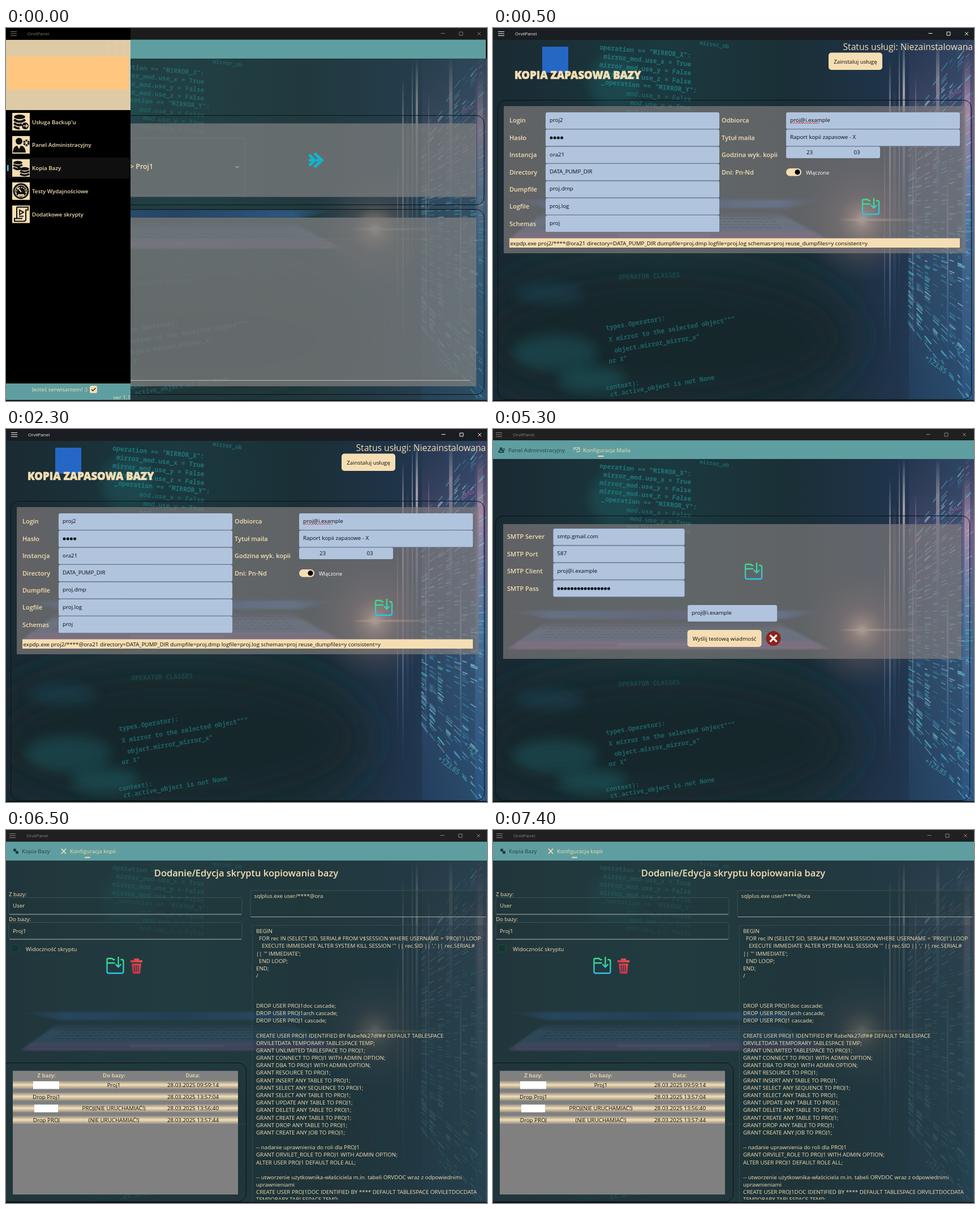
An HTML page for the animation above (8 s loop, 850 by 659 pixels).

```html
<!DOCTYPE html>
<html lang="pl">
<head>
<meta charset="utf-8">
<title>OrvilPanel</title>
<style>
  html, body { margin: 0; width: 100%; height: 100%; overflow: hidden; background: #000; }
  svg { display: block; }
  text { font-family: "Open Sans", sans-serif; white-space: pre; }
  .code text { font-family: "Noto Sans Mono", monospace; font-weight: 600; fill: #207d82; }
</style>
</head>
<body>
<svg id="stage" width="850" height="659" viewBox="0 0 850 659"></svg>
<script>
const WHEAT = '#f5deb3', CADET = '#5f9ea0', STEEL = '#b0c4de', INK = '#0c0c0c';
const BASE = 9.75;

const rect = (x, y, w, h, fill, extra = '') =>
  `<rect x="${x}" y="${y}" width="${w}" height="${h}" fill="${fill}" ${extra}/>`;
const path = (d, stroke, width = 1, extra = '') =>
  `<path d="${d}" fill="none" stroke="${stroke}" stroke-width="${width}" ${extra}/>`;
const circle = (x, y, r, fill, extra = '') => `<circle cx="${x}" cy="${y}" r="${r}" fill="${fill}" ${extra}/>`;
const ellipse = (x, y, rx, ry, fill, extra = '') =>
  `<ellipse cx="${x}" cy="${y}" rx="${rx}" ry="${ry}" fill="${fill}" ${extra}/>`;
const haze = (x, y, rx, ry, fill, alpha) => ellipse(x, y, rx, ry, fill, `opacity="${alpha}" filter="url(#haze)"`);
const at = (x, y, body) => `<g transform="translate(${x} ${y})">${body}</g>`;
// y is the middle of the capitals
const text = (x, y, s, { size = BASE, fill = WHEAT, weight = 400, anchor = 'start', extra = '' } = {}) =>
  `<text x="${x}" y="${y + size * .36}" font-size="${size}" fill="${fill}" font-weight="${weight}" text-anchor="${anchor}" ${extra}>${s}</text>`;
const label = (x, y, s) => text(x, y, s, { size: 11, weight: 600 });
const dark = (x, y, s, anchor) => text(x, y, s, { fill: INK, anchor });
const outline = (x, y, w, h) => rect(x, y, w, h, 'none', 'rx="14" stroke="#0b1416"');
const field = (x, y, w, s) => rect(x, y, w, 29.6, STEEL, 'rx="3"') +
  path(`M${x + 2} ${y + 29.4}h${w - 4}`, '#6f7f92') + dark(x + 7, y + 13.5, s);
const dots = (x, y, n, step) =>
  Array.from({ length: n }, (_, i) => circle(x + i * step, y, 2.5, INK)).join('');

function stops(list) {
  return list.map(([o, c, a = 1]) => `<stop offset="${o}" stop-color="${c}" stop-opacity="${a}"/>`).join('');
}
const linear = (id, dir, list) => `<linearGradient id="${id}" ${dir}>${stops(list)}</linearGradient>`;
const DOWN = 'x1="0" y1="0" x2="0" y2="1"', ACROSS = '';

let seed = 11;
const rnd = () => (seed = (seed * 16807) % 2147483647) / 2147483647;

const defs = `<defs>
  ${linear('room', ACROSS, [[0, '#1a2a33'], [.36, '#1b393f'], [.62, '#1a2f36'], [.84, '#20344c'], [1, '#2a4a68']])}
  ${linear('lid', ACROSS, [[0, '#264a83', 0], [.15, '#2b5a9c'], [.5, '#24407a'], [.85, '#2f62a6'], [1, '#264a83', 0]])}
  ${linear('desk', DOWN, [[0, '#27324f'], [.3, '#3f6486'], [.65, '#3c5c86'], [.75, '#7b5c92'], [1, '#57477a']])}
  ${linear('streak', DOWN, [[0, '#fff', 0], [.25, '#e2bfc4', .9], [.6, '#8fb2dc', .6], [1, '#4b7fd0', 0]])}
  ${linear('pane', DOWN, [[0, '#55304f', .3], [.2, '#9a6a9c', .8], [.5, '#5d7fa8', .7], [1, '#2c5f98', .6]])}
  ${linear('save', DOWN, [[0, '#43e07c'], [1, '#2cc4ea']])}
  ${linear('bin', 'x1="0" y1="1" x2="1" y2="0"', [[0, '#b5274f'], [1, '#f0554a']])}
  ${linear('row', DOWN, [[0, '#8c8a86'], [.5, WHEAT], [1, '#969086']])}
  <radialGradient id="glow">${stops([[0, '#f8e2cc', 1], [.13, '#d3ab96', .75], [.4, '#8d6a66', .4], [1, '#54505a', 0]])}</radialGradient>
  ${linear('ray', ACROSS, [[0, '#d9a98c', 0], [.2, '#f3cdb0', .8], [1, '#d9a98c', 0]])}
  <filter id="soft" x="-20%" y="-20%" width="140%" height="140%"><feGaussianBlur stdDeviation="1.8"/></filter>
  <filter id="haze" x="-50%" y="-50%" width="200%" height="200%"><feGaussianBlur stdDeviation="10"/></filter>
  <filter id="dusk" x="-50%" y="-50%" width="200%" height="200%"><feGaussianBlur stdDeviation="35"/></filter>
</defs>`;

// Code along the right wall: every row lies on a line through one vanishing point
function codeWall() {
  const tints = ['#4cc4c0', '#4692c8', '#9cc6d6', '#35789f'];
  let out = rect(735, 0, 115, 606, 'url(#pane)', 'opacity=".3"') + rect(829, 0, 21, 606, 'url(#pane)', 'opacity=".65"');
  for (let column = 0; column < 8; column++) {
    const x = 734 + column * 14.5, reach = (x - 600) / 250;
    for (let i = 0; i < 75; i++) {
      const slope = (rnd() - .5) * 2.6, y = 302 + slope * 250 * reach, len = 4 + 9 * rnd();
      out += path(`M${x} ${y.toFixed(1)}l${len.toFixed(1)} ${(len * slope).toFixed(1)}`,
        tints[Math.floor(4 * rnd())], 1.7, `opacity="${(.25 + .5 * rnd()).toFixed(2)}"`);
    }
  }
  for (const [x, y, h, w, a] of [[691, 170, 340, 2, .45], [700, 32, 510, 3, .75], [707, 80, 400, 5, .25], [717, 2, 430, 2, .6],
    [724, 0, 350, 4, .8], [741, 180, 350, 2, .5], [746, 60, 330, 2, .5], [783, 0, 290, 6, .5], [802, 220, 330, 3, .4], [833, 30, 380, 10, .5]])
    out += rect(x, y, w, h, 'url(#streak)', `opacity="${a}"`);
  const figure = (x, y, turn, s, fill) =>
    `<text transform="translate(${x} ${y}) rotate(${turn})" font-size="12" fill="${fill}" opacity=".75">${s}</text>`;
  return out + figure(805, 100, -30, '+345', '#d058a0') + figure(762, 535, 35, '+123.85', '#4cc4c0') + figure(808, 510, 38, '+123', '#4cc4c0');
}

function laptop() {
  let out = `<g filter="url(#soft)"><path d="M90 290H505L595 336H25Z" fill="url(#desk)" opacity=".9"/>
    <path d="M20 268H590L520 282H95Z" fill="url(#lid)" opacity=".9"/>
    ${path('M220 328H385', '#a9a2c4', 3, 'opacity=".45"')}${path('M40 334H580', '#a06ba8', 2.5, 'opacity=".7"')}</g>`;
  for (let y = 295; y < 317; y += 5)
    out += path(`M${105 - (y - 295)} ${y}H${490 + (y - 295)}`, '#1d2c44', 1.5, 'stroke-dasharray="8 3" opacity=".6"');
  return out;
}

// Blurred photo of a code wall and a laptop, drawn in an 850 x 606 box
function photo() {
  const mono = (x, y, turn, s, anchor = 'start', size = 11.3, alpha = .7) =>
    `<text transform="translate(${x} ${y}) rotate(${turn})" font-size="${size}" text-anchor="${anchor}" opacity="${alpha}">${s}</text>`;
  const upper = ['operation == "MIRROR_X":', 'mirror_mod.use_x = True', 'mirror_mod.use_y = False',
    'mirror_mod.use_z = False', '_operation == "MIRROR_Y":', 'mod.use_x = False', 'mod.use_y = True', 'mod.use_z = False'];
  const lower = [[200, 487, 'types.Operator):'], [205, 507, 'X mirror to the selected object"""'], [215, 525, 'object.mirror_mirror_x"'],
    [205, 543, 'or X"'], [200, 588, 'context):'], [208, 599, 'ct.active_object is not None']];
  return rect(0, 0, 850, 606, 'url(#room)') +
    ellipse(300, 500, 340, 130, '#16262a', 'opacity=".9" filter="url(#dusk)"') +
    haze(110, 525, 75, 30, '#1d5a60', .5) + haze(175, 570, 60, 22, '#1f666b', .45) +
    haze(100, 425, 60, 16, '#1b4a5c', .5) + haze(215, 70, 45, 45, '#1d6468', .4) +
    laptop() + '<g class="code">' +
    upper.map((s, i) => mono(350 + (i == 4 ? 10 : 0), 30 + i * 14.7, 5, s, 'end', 11.3, i > 4 ? .6 : .9)).join('') +
    mono(365, 8, 7, 'mirror_ob', 'start', 9.6) + mono(222, 402, -2, 'OPERATOR CLASSES', 'start', 11.3, .35) +
    lower.map(([x, y, s]) => mono(x, y, -9, s, 'start', 11.1)).join('') + '</g>' +
    codeWall() + circle(652, 302, 105, 'url(#glow)') + rect(610, 300, 170, 4, 'url(#ray)');
}
const backdrop = top => `<use href="#photo" transform="translate(0 ${top}) scale(1 ${(659 - top) / 606})"/>`;

function titleBar(x, fill, bg, right, height = 20) {
  const [a, b, c] = [right - 64, right - 32, right];
  return rect(0, 0, 850, height, bg) +
    path(`M${x - 30} 6.5h11m-11 3.5h11m-11 3.5h11`, fill) +
    text(x, 10.5, 'OrvilPanel', { size: 8, fill }) +
    path(`M${a - 3.5} 9.5h7M${b - 3} 7h6v6h-6zM${c - 3} 7l6 6m0-6l-6 6`, fill);
}
const tab = (x, s, active) => text(x, 37.5, s, { fill: active ? WHEAT : '#223e42' });
const saveIcon = (x, y) => at(x, y, path('M16 5h-3l-2-2H4q-2 0-2 2v21q0 3 3 3h23q3 0 3-3V8q0-3-3-3h-2M2 11h14M22 0v18m-5-5l5 5 5-5', 'url(#save)', 2.3));
const footLine = rect(0, 657.5, 850, 1.5, '#05080a');

function menuScene() {
  const icons = [
    ellipse(13, 7, 10, 4, '#111') + path('M3 12q10 7 20 0M3 18q8 6 14 2M3 24q5 4 10 3', '#111', 4) + circle(23, 23, 6, '#111') + path('M19 23h8m-3-3l3 3-3 3', WHEAT, 1.5),
    circle(12, 9, 6, '#111') + `<path d="M1 29q1-12 8-12l3 6 3-6q8 0 9 12z" fill="#111"/>` + circle(25, 12, 4, 'none', 'stroke="#111" stroke-width="3.5" stroke-dasharray="3 1.2"'),
    ellipse(10, 6, 8, 3, '#111') + path('M2 10q8 5 16 0M2 15q8 5 14 1', '#111', 3.5) + ellipse(22, 17, 8, 3, '#111') + path('M14 21q8 5 16 0M14 26q8 5 16 0', '#111', 3.5) + path('M9 13l9 6', '#111', 3),
    circle(15.5, 15.5, 14, '#111') + circle(15.5, 15.5, 11, WHEAT) + circle(15.5, 15.5, 10, '#111') + path('M7 20q0-11 8.5-11t8.5 11', WHEAT, 2, 'stroke-dasharray="2 2"') + path('M9 9l7 8', WHEAT, 2) + rect(10, 21, 11, 3, WHEAT),
    path('M8 3h20v5h-4v16q0 4-4 4H4v-5h14M8 3v20', '#111', 2) + path('M13 8l7 4-7 4zM12 19h8', '#111', 1.8)
  ];
  const names = ["Usługa Backup'u", 'Panel Administracyjny', 'Kopia Bazy', 'Testy Wydajnościowe', 'Dodatkowe skrypty'];
  const panel = 'rgba(128,128,128,.72)', thin = 'stroke="#777b7b" stroke-opacity=".7"';
  return backdrop(54) + rect(0, 54, 850, 605, '#2e4c4c', 'opacity=".36"') +
    titleBar(38, '#777', '#1c1c1c', 836) + rect(220, 20.5, 628, 33.5, CADET) +
    outline(100, 154.5, 745, 158) + rect(200, 168.5, 631, 130, panel) + rect(200, 195, 222, 100, 'none', thin) +
    text(219, 245, '&gt; Proj1', { size: 12.4, weight: 600 }) + path('M405.5 244l3 3 3-3', '#ddd') +
    path('M536 224l9 9.5-9 9.5', '#12b5d0', 5) + path('M545 221l13 12.5-13 12.5', '#12b5d0', 5) + path('M535 233.5h18', '#12b5d0', 4) +
    outline(100, 320.5, 745, 327) + rect(200, 335, 631, 298, panel) + rect(200, 373, 620, 250, 'none', thin) + path('M200 622.5H820', '#b9b9b0') +
    rect(0, 0, 220, 659, '#000') + titleBar(38, '#8a7f68', 'none', -99) +
    rect(0, 21, 220, 124, '#decba6') + path('M181 28v18M195 24v22M210 22v26', '#e9c9ac', 4, 'opacity=".6"') +
    rect(2, 50, 214, 59, '#ffc680') +
    rect(2, 229, 216, 37, '#0f0f0f', 'rx="4"') + rect(2, 242, 2.5, 11, '#4cc2ff', 'rx="1"') +
    names.map((s, i) => at(11, 150 + i * 40.9, rect(0, 0, 31, 31, WHEAT) + icons[i]) +
      text(46, 166 + i * 40.9, s, { weight: 600 })).join('') +
    rect(0, 628, 220, 29.5, CADET) + text(46, 638.5, 'Jesteś serwisantem! :)') +
    rect(148, 632, 13, 13, WHEAT, 'rx="3"') + path('M151 638.5l2.5 2.5 5-5', '#222', 1.3) +
    text(220, 652, 'ver 1.1', { anchor: 'end' }) + footLine;
}

function backupScene() {
  const left = [['Login', 'proj2'], ['Hasło', ''], ['Instancja', 'ora21'], ['Directory', 'DATA_PUMP_DIR'],
    ['Dumpfile', 'proj.dmp'], ['Logfile', 'proj.log'], ['Schemas', 'proj']];
  const right = ['Odbiorca', 'Tytuł maila', 'Godzina wyk. kopii', 'Dni: Pn-Nd'];
  const step = 30.35;
  return backdrop(21) + titleBar(39, '#f2f2f2', '#1a1d21', 837, 21) +
    rect(87, 33, 46, 46, '#2467c4') +
    text(38, 83, 'KOPIA ZAPASOWA BAZY', { size: 18.5, weight: 800, extra: `stroke="${WHEAT}" stroke-width=".7"` }) +
    text(848, 33, 'Status usługi: Niezainstalowana', { size: 15.7, anchor: 'end' }) +
    rect(593, 43.5, 95, 30.5, WHEAT, 'rx="5"') + dark(640.5, 59, 'Zainstaluj usługę', 'middle') +
    outline(8.5, 127.5, 837, 529) + rect(19, 138, 816.5, 260, 'rgba(133,126,126,.66)') +
    left.map(([name, value], i) => label(29, 163.5 + i * step, name) + field(93, 149 + i * step, 307, value)).join('') +
    dots(103, 194, 4, 6.2) +
    right.map((name, i) => label(404, 163.5 + i * step, name)).join('') +
    field(518, 149, 307, 'proj@i.example') + field(518, 179.35, 307, 'Raport kopii zapasowe - X') +
    path('M525 167' + 'l2 2 2-2'.repeat(13), '#e0303a', .9) +
    rect(518, 209.5, 166, 20.5, STEEL, 'rx="3"') + dark(559.5, 219.5, '23', 'middle') + dark(643, 219.5, '03', 'middle') +
    rect(518, 248, 27, 13.5, WHEAT, 'rx="6.75"') + circle(538, 254.7, 4.6, '#000') + text(553, 255.5, 'Włączone', { fill: '#fff', size: 9.2 }) +
    saveIcon(651, 300) +
    rect(29, 371.5, 796, 16.5, WHEAT) +
    dark(30.5, 380, 'expdp.exe proj2/****@ora21 directory=DATA_PUMP_DIR dumpfile=proj.dmp logfile=proj.log schemas=proj reuse_dumpfiles=y consistent=y') + footLine;
}

function mailScene() {
  const rows = [['SMTP Server', 'smtp.gmail.com'], ['SMTP Port', '587'], ['SMTP Client', 'proj@i.example'], ['SMTP Pass', '']];
  return backdrop(53) + titleBar(35, '#858585', '#202020', 833) + rect(0, 20, 850, 33, CADET) +
    circle(14, 34.5, 2.3, '#223e42') + path('M10.5 41q0-4 4-4t4 4z', '#223e42', 2) + circle(19, 36, 1.7, 'none', 'stroke="#223e42"') +
    tab(27, 'Panel Administracyjny') + path('M143 33h10v7h-6M143 33l5 4 5-4M143 33v5', WHEAT) +
    tab(159, 'Konfiguracja Maila', true) + rect(185, 47, 11, 2, WHEAT, 'rx="1"') +
    outline(4.5, 153.5, 838, 503) + rect(18, 168, 810, 238, 'rgba(133,126,126,.66)') +
    rows.map(([name, value], i) => label(25, 190.5 + i * 30.4, name) + field(106.5, 176 + i * 30.4, 232, value)).join('') +
    dots(116, 282, 16, 5.9) + saveIcon(444, 236) +
    field(344, 311, 158, 'proj@i.example') +
    rect(343.5, 355, 131, 30, WHEAT, 'rx="5"') + dark(409, 370.5, 'Wyślij testową wiadmość', 'middle') +
    circle(495.5, 370, 13, '#8f2019') + path('M489.5 364l12 12m0-12l-12 12', '#eee', 3.4) + footLine;
}

function scriptScene() {
  const sql = `BEGIN
  FOR rec IN (SELECT SID, SERIAL# FROM V$SESSION WHERE USERNAME = 'PROJ1') LOOP
    EXECUTE IMMEDIATE 'ALTER SYSTEM KILL SESSION ''' || rec.SID || ',' || rec.SERIAL#
|| ''' IMMEDIATE';
  END LOOP;
END;
/



DROP USER PROJ1doc cascade;
DROP USER PROJ1arch cascade;
DROP USER PROJ1 cascade;

CREATE USER PROJ1 IDENTIFIED BY RabeNk27df## DEFAULT TABLESPACE
ORVILETDATA TEMPORARY TABLESPACE TEMP;
GRANT UNLIMITED TABLESPACE TO PROJ1;
GRANT CONNECT TO PROJ1 WITH ADMIN OPTION;
GRANT DBA TO PROJ1 WITH ADMIN OPTION;
GRANT RESOURCE TO PROJ1;
GRANT INSERT ANY TABLE TO PROJ1;
GRANT SELECT ANY SEQUENCE TO PROJ1;
GRANT SELECT ANY TABLE TO PROJ1;
GRANT UPDATE ANY TABLE TO PROJ1;
GRANT DELETE ANY TABLE TO PROJ1;
GRANT CREATE ANY TABLE TO PROJ1;
GRANT DROP ANY TABLE TO PROJ1;
GRANT CREATE ANY JOB TO PROJ1;

-- nadanie uprawnienia do roli dla PROJ1
GRANT ORVILET_ROLE TO PROJ1 WITH ADMIN OPTION;
ALTER USER PROJ1 DEFAULT ROLE ALL;

-- utworzenie użytkownika-właściciela m.in. tabeli ORVDOC wraz z odpowiednimi
uprawnieniami
CREATE USER PROJ1DOC IDENTIFIED BY **** DEFAULT TABLESPACE ORVILETDOCDATA
TEMPORARY TABLESPACE TEMP;`.split('\n');
  const rows = [['', 'Proj1', '09:59:14'], ['Drop Proj1', '', '13:57:04'],
    ['', 'PROJ(NIE URUCHAMIAĆ!)', '13:56:40'], ['Drop PROJ', '(NIE URUCHAMIAĆ!)', '13:57:44']];
  const entry = (x, y, w, h) => rect(x, y, w, h, 'rgba(30,52,56,.35)', 'rx="3" stroke="#3a5256"') + path(`M${x + 1} ${y + h}h${w - 2}`, '#a3aaa0');
  const head = (x, s) => text(x, 433.5, s, { weight: 600, anchor: 'middle' });
  return backdrop(54) + rect(0, 54, 850, 605, '#263e41', 'opacity=".62"') +
    titleBar(36, '#858585', '#202020', 835) + rect(0, 20.5, 850, 33.5, CADET) +
    rect(13, 33, 5, 5, '#223e42', 'rx="1"') + rect(17, 37, 5, 5, '#223e42', 'rx="1"') + tab(28, 'Kopia Bazy') +
    path('M98 33l8 9m0-9l-8 9', WHEAT, 1.7) + tab(113, 'Konfiguracja kopii', true) + rect(139, 47.5, 10, 2, WHEAT, 'rx="1"') +
    text(424.5, 76.5, 'Dodanie/Edycja skryptu kopiowania bazy', { size: 16.5, weight: 600, anchor: 'middle' }) +
    text(5, 113, 'Z bazy:') + entry(5, 119.5, 412, 29.5) + text(12, 133.5, 'User') +
    text(5, 157, 'Do bazy:') + entry(5, 163.5, 412, 29.5) + text(12, 178, 'Proj1') +
    rect(9.5, 203, 12.5, 12.5, '#15352f', 'rx="2" stroke="#224a44"') + text(35, 210, 'Widoczność skryptu') +
    saveIcon(176.5, 224) +
    at(219, 226, `<path d="M1 4h6V1h9v3h6v4H1zM3 10h17l-2 18H5z" fill="url(#bin)"/>` + path('M8 13v11m3.5-11v11m3.5-11v11', '#263e41', 1.4)) +
    entry(432, 107, 417, 46.5) + text(438.5, 116, 'sqlplus.exe user/****@ora') +
    rect(435.5, 168.5, 413, 489, 'rgba(30,52,56,.3)', 'stroke="#3a5256" stroke-opacity=".7"') +
    `<svg width="850" height="653">${sql.map((s, i) => text(442, 178.5 + i * 13.18, s)).join('')}</svg>` +
    outline(-8.5, 411.5, 433, 245) + rect(12, 425.5, 398, 218.5, '#808080') +
    head(71.5, 'Z bazy:') + head(191, 'Do bazy:') + head(330, 'Data:') +
    rows.map(([from, to, time], i) => {
      const y = 450.5 + i * 20.6;
      return rect(12, y - 7.5, 398, 14.5, 'url(#row)') +
        (from ? dark(71.5, y, from, 'middle') : rect(i ? 50 : 48, y - 6.5, i ? 42 : 46, 13.5, '#fff')) +
        dark(190.5, y, to, 'middle') + dark(330.5, y, '28.03.2025 ' + time, 'middle');
    }).join('') + footLine;
}

const stage = document.getElementById('stage');
const scenes = [menuScene, backupScene, mailScene, scriptScene];
stage.innerHTML = defs + `<defs><g id="photo">${photo()}</g></defs>` +
  scenes.map(draw => `<g class="scene" display="none">${draw()}</g>`).join('');

const layers = [...stage.querySelectorAll('.scene')];
const ends = [500, 3500, 6500, 8000];
function tick() {
  const now = performance.now() % 8000;
  const current = ends.findIndex(end => now < end);
  layers.forEach((layer, i) => layer.setAttribute('display', i === current ? 'inline' : 'none'));
  requestAnimationFrame(tick);
}
tick();
</script>
</body>
</html>
```
